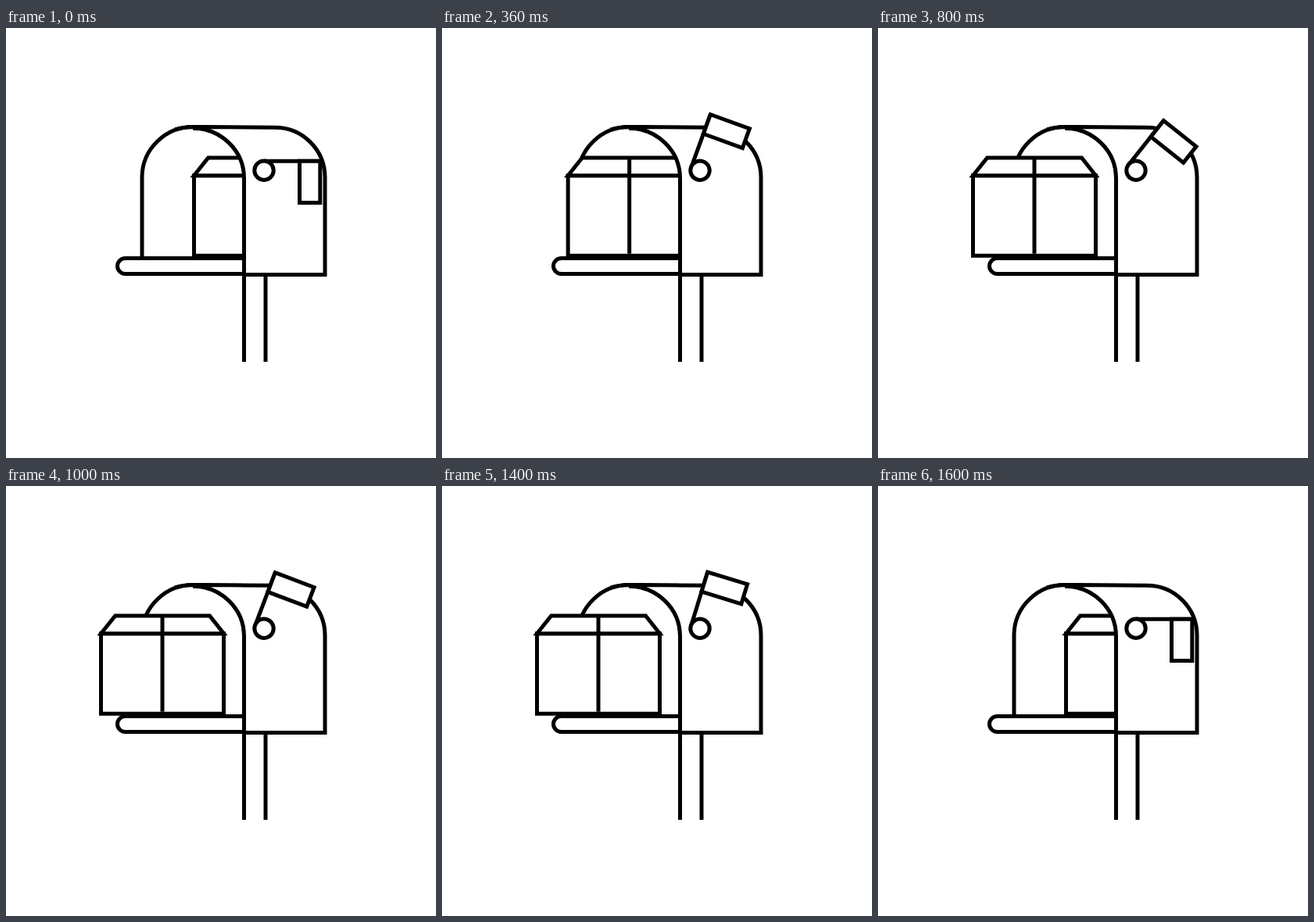
Recreate the animation shown at these times as an HTML page. Size 550 px wide and 550 px high, loop 2 s.

```html
<!DOCTYPE html>
<html lang="en">
<head>
<meta charset="utf-8">
<title>Mailbox</title>
<style>
  html, body { margin: 0; width: 100%; height: 100%; overflow: hidden; background: #fff; }
  svg { display: block; width: 100vw; height: 100vh; }
</style>
</head>
<body>
<svg viewBox="0 0 550 550" fill="#fff" stroke="#000" stroke-width="5">
  <path d="M304.5 316V427M332 316V427"/>
  <path d="M174 294V190A65.25 64.5 0 0 1 304.5 192V294"/>
  <path d="M304.5 294.5H152.5a10 10 0 0 0 0 20H304.5z"/>
  <g id="parcel">
    <path d="M121.5 188.7H278.5V291.2H121.5z"/>
    <path d="M121.5 188.7L139.7 166H260.5L278.5 188.7z"/>
    <path d="M200 166V288.7"/>
  </g>
  <!-- side of the box hides the parcel -->
  <path stroke="none" d="M304.5 315.5V192A65.25 64 0 0 0 239 128.3L344 127.3A64 64 0 0 1 408 191V315.5z"/>
  <path fill="none" d="M216 130Q227 126.5 240 126.5L344 127.2A64 64 0 0 1 408 191V315.5H304.5V192A65.25 64 0 0 0 239 128.3"/>
  <g id="flag">
    <path d="M330 170.3H402"/>
    <path d="M375.5 170.3H401.8V223.5H375.5z"/>
    <circle cx="330" cy="182.2" r="12.2"/>
  </g>
</svg>
<script>
const LOOP = 2000, STEP = 40;
const UP = 87.5, LOW = 31;

// [time in ms, value], linear in between
const flagKeys = [[200, 0], [400, UP], [720, LOW], [940, UP], [1126, LOW], [1360, UP], [1600, 0]];
const parcelKeys = [[200, 119], [440, 0], [1400, 0], [1600, 119]];

const flag = document.getElementById('flag');
const parcel = document.getElementById('parcel');

function valueAt(keys, t) {
  if (t <= keys[0][0]) return keys[0][1];
  for (let i = 1; i < keys.length; i++) {
    const [t0, v0] = keys[i - 1], [t1, v1] = keys[i];
    if (t <= t1) return v0 + (v1 - v0) * (t - t0) / (t1 - t0);
  }
  return keys[keys.length - 1][1];
}

function draw(now) {
  const t = Math.floor((now % LOOP) / STEP) * STEP;
  flag.setAttribute('transform', `rotate(${-valueAt(flagKeys, t)} 330 182.2)`);
  parcel.setAttribute('transform', `translate(${valueAt(parcelKeys, t)} 0)`);
}

const start = performance.now();
function tick() {
  draw(performance.now() - start);
  requestAnimationFrame(tick);
}
tick();
</script>
</body>
</html>
```
